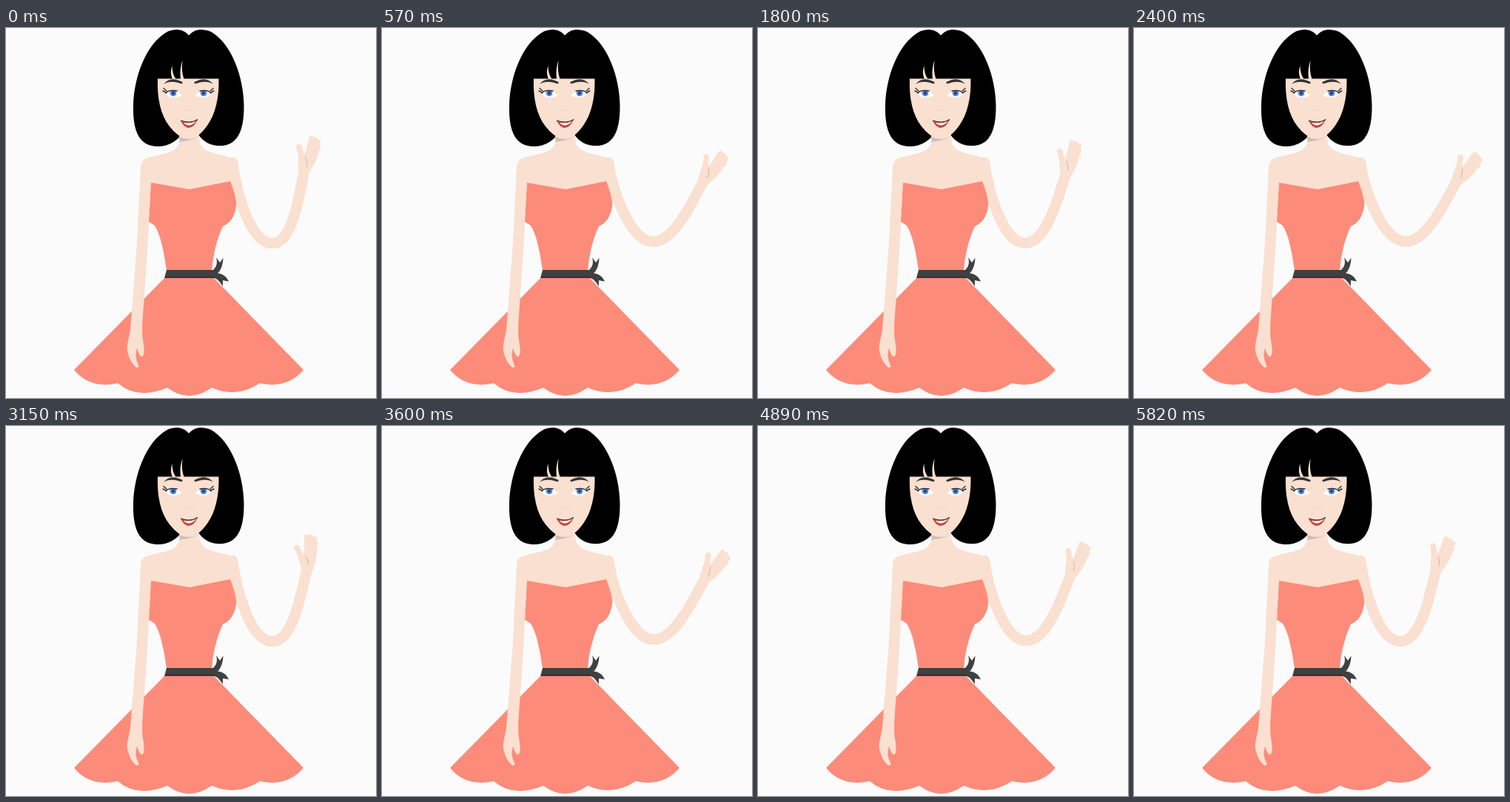
An HTML page for the animation above (5850 ms loop, 500x500 px).

```html
<!DOCTYPE html>
<html lang="en">
<head>
<meta charset="utf-8">
<title>Waving woman</title>
<style>
  html, body { margin: 0; width: 100%; height: 100%; overflow: hidden; background: #fbfbfb; }
  svg { display: block; width: 100vw; height: 100vh; }
  .skin { fill: #fae0d0; }
  .dress { fill: #fd8b7a; }
  .dark { fill: #404040; }
  .line { fill: none; stroke: #fae0d0; stroke-linecap: round; }
  .lash { fill: none; stroke: #2e2e33; stroke-linecap: round; }
</style>
</head>
<body>
<svg viewBox="0 0 500 500">
  <!-- hair -->
  <path d="M247 10C241 2 229 0 218 5C188 22 173 68 172 104C171 141 181 160 205 160C221 160 231 152 237 144H260C268 156 280 160 293 159C312 157 322 140 321.500 104C321 68 306 22 277 5C264 0 254 2 247 10Z"/>

  <!-- neck and shoulders -->
  <path class="skin" d="M234 146C236 164 226 168 200 173C186 176 182 179 182 190L190 222H300L312 238L319.500 213L313.500 187C313 179 308 176 292 172C270 167 261 164 261 146Z"/>
  <path fill="#d3beb2" d="M234 147Q247 153 260 146Q252 152 235 154Z"/>

  <!-- waving arm -->
  <path id="arm" class="line" stroke-width="14.5"/>
  <g id="hand">
    <path class="skin" d="M-7.500 4C-9-6-8-14-9-20L0-20L4-26L19-27C20-18 14-8 7.500 4Q0 10-7.500 4Z"/>
    <g class="line" stroke-width="6">
      <path d="M3-18L9-41M7-18L14.500-39.500M10-17L19-36M10-14L19-29"/>
      <path stroke-width="7.500" d="M-3-6Q-4-19-7.500-29.500"/>
    </g>
    <path fill="none" stroke="#c9ada0" stroke-width=".8" d="M1-16Q4-10 3-3"/>
  </g>

  <!-- dress -->
  <path class="dress" d="M196 209L248 218L303 207C309 222 312 235 311 241C309 256 302 264 293 268C285 285 280 305 278 328H217C213 300 209 280 201 267L192 261Z"/>
  <path class="dress" d="M215 337L92 462Q113 488 151 480Q178 503 218 486Q247 508 278 486Q312 501 343 480Q380 488 402 462L280 337Z"/>
  <path class="dark" d="M217 327H280C285 322 286 317 284 310L289 317L293.500 310.500C293 321 290 328 286 331.500C293 332 298 336 301 342.500L293 341V349C289 343 286 339 281 338H214Z"/>
  <path fill="none" stroke="#171717" stroke-dasharray="1 1" d="M216 336.500H281"/>

  <!-- resting arm -->
  <path class="skin" d="M182 188L177 290L168 408C166 420 163 428 164 436C166 446 171 456 177 459C180 459 180 456 178 453C175 446 175 440 177 433C179 439 181 444 184 444C187 443 187 436 186 428Q184 418 184 408C186 370 191 310 193 264L196 208Z"/>

  <!-- face -->
  <path class="skin" d="M205 68.500H287.500C288 95 283 116 272.500 131C265 142 256 150 247 150C238 150 229 143 221 133C209 118 204 95 205 68.500Z"/>
  <path class="skin" d="M224.500 51C221.500 60 223.500 65 225 69H229.500Q224.500 62 224.500 51ZM238.500 44C234.500 55 235.500 63 236 69H240.500Q236.500 58 238.500 44Z"/>
  <g id="eye">
    <path fill="#333" d="M213 76Q222 64 238.500 73Q239 76 236 75Q222 70 213 76Z"/>
    <path fill="#fff" d="M215 87Q224 81 232 86L238 91Q228 96 221 93Q217 91 215 87Z"/>
    <circle cx="226" cy="88" r="4.300" fill="#5580d4"/>
    <circle cx="226" cy="88" r="1.700" fill="#1d2b50"/>
    <path class="lash" stroke-width="1.400" d="M216 88Q220 83 231 85M216 87L212 85M217 85L213 81.500"/>
  </g>
  <use href="#eye" transform="matrix(-1 0 0 1 493 0)"/>
  <path fill="none" stroke="#efcfc0" d="M241 111Q243 113 245 111M249 111Q251 113 253 111"/>
  <path fill="#c9483f" d="M236 125Q240 134.500 247 135Q255 134 259 123.500Q249 130 236 125Z"/>
  <path fill="#fff" d="M240 127.500Q249 130 257 125.500Q253 131 247 131.500Q242 131 240 127.500Z"/>
  <path fill="none" stroke="#4a3030" stroke-width="1.200" d="M236 125Q249 130 259 123.500"/>
</svg>
<script>
  const LOOP = 5850, WAVE = 1500, STEP = 30;
  const arm = document.getElementById('arm');
  const hand = document.getElementById('hand');

  // Hand tilt over one wave: [ms, degrees]
  const tilt = [[0, 0], [150, -13.5], [300, -2], [390, 7], [600, 21], [750, 26],
                [900, 22], [1140, 2], [1170, 0], [1320, 6]];

  function key(i) {
    const n = tilt.length, turn = Math.floor(i / n);
    const [ms, deg] = tilt[i - turn * n];
    return [ms + turn * WAVE, deg];
  }

  function slope(i) {
    const [a, b] = [key(i - 1), key(i + 1)];
    return (b[1] - a[1]) / (b[0] - a[0]);
  }

  // Smooth periodic curve through the tilt keys
  function tiltAt(ms) {
    let i = 0;
    while (key(i + 1)[0] <= ms) i++;
    const [a, b] = [key(i), key(i + 1)];
    const d = b[0] - a[0], u = (ms - a[0]) / d, v = 1 - u;
    return v * v * ((1 + 2 * u) * a[1] + u * d * slope(i)) +
           u * u * ((1 + 2 * v) * b[1] - v * d * slope(i + 1));
  }

  function draw(now) {
    const t = Math.floor(now % LOOP / STEP) * STEP;
    const ms = t % WAVE;
    const p = (1 - Math.cos(2 * Math.PI * ms / WAVE)) / 2;
    const ex = 360 + 8.5 * p * p, ey = 291 - 3 * p * p;
    const wx = 403.5 + 37 * p, wy = 190 + 16.6 * p;
    arm.setAttribute('d',
      `M306 182C311.500 222 ${ex - 30} ${ey} ${ex} ${ey}` +
      `C${ex + 26 + 2 * p} ${ey} ${395 + 26 * p} ${235 + 5 * p} ${wx} ${wy}`);
    hand.setAttribute('transform', `translate(${wx} ${wy}) rotate(${tiltAt(ms)})`);
  }

  const start = performance.now();
  function tick() {
    draw(performance.now() - start);
    requestAnimationFrame(tick);
  }
  tick();
</script>
</body>
</html>
```
